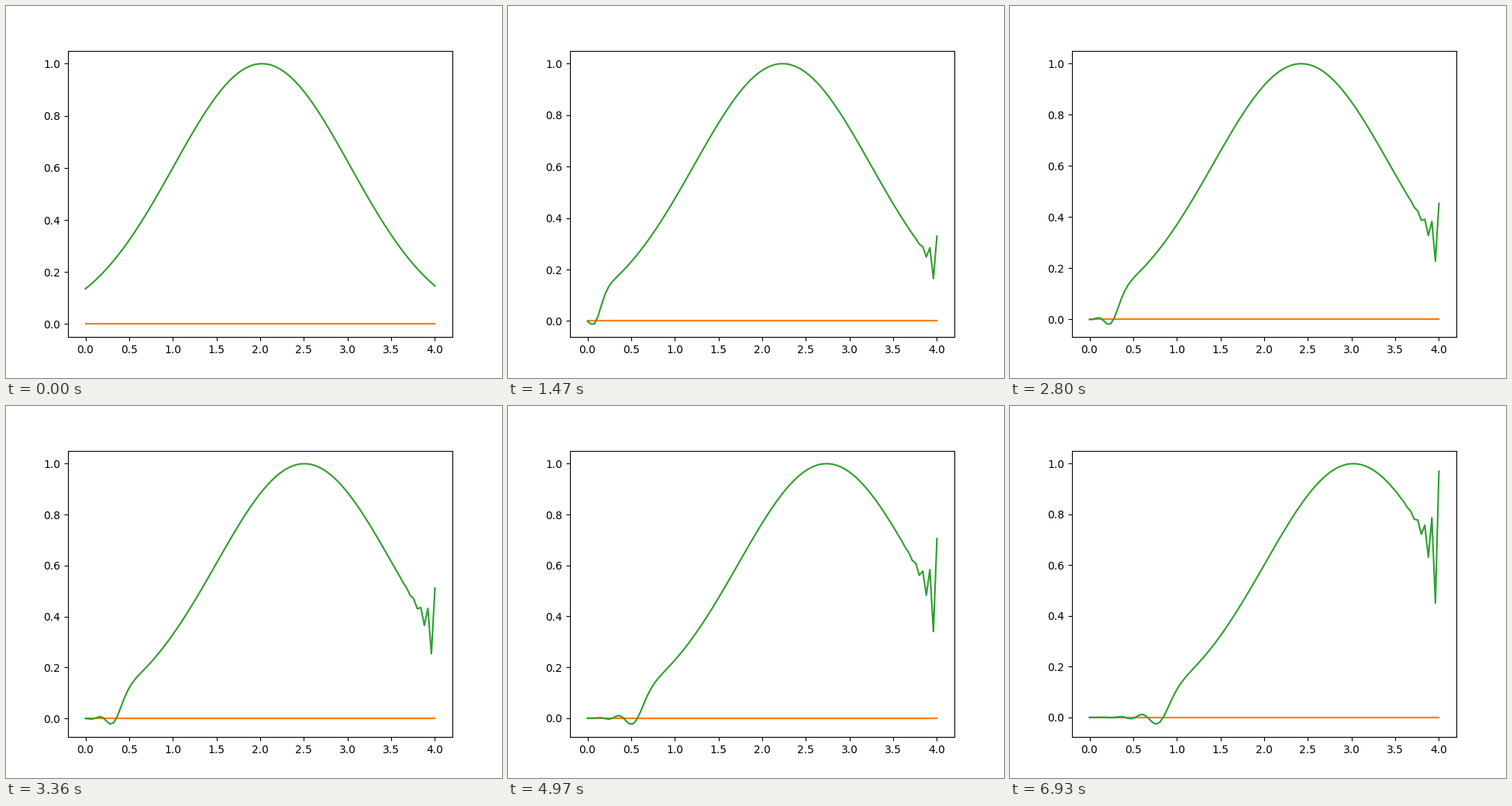
A matplotlib script for the animation above (7 s loop, 640 by 480 pixels).

```python
import numpy as np
import matplotlib.pyplot as plt
from matplotlib.animation import FuncAnimation

N = 100           # grid points
DX = 0.04
C = 0.25          # Courant number
FRAMES = 100


def lax_wendroff(u):
    """Advance one step, with zero ghost cells at both ends."""
    p = np.pad(u, 1)
    left, right = p[:-2], p[2:]
    return u - C / 2 * (right - left) + C**2 / 2 * (right - 2 * u + left)


def solve():
    states = [np.exp(-(np.arange(N) * DX - 2)**2 / 2)]
    while len(states) < FRAMES:
        states.append(lax_wendroff(states[-1]))
    return states


states = solve()
x = np.linspace(0, 4, N)

fig, ax = plt.subplots(figsize=(6.4, 4.8), dpi=100)
ax.plot(x, np.zeros(N))
ax.plot(x, np.zeros(N))
wave, = ax.plot(x, states[0])


def update(i):
    wave.set_ydata(states[i])
    ax.relim()
    ax.autoscale_view()
    return wave,


anim = FuncAnimation(fig, update, frames=FRAMES, interval=70,
                     repeat=True, repeat_delay=0, blit=False)
plt.show()
```
